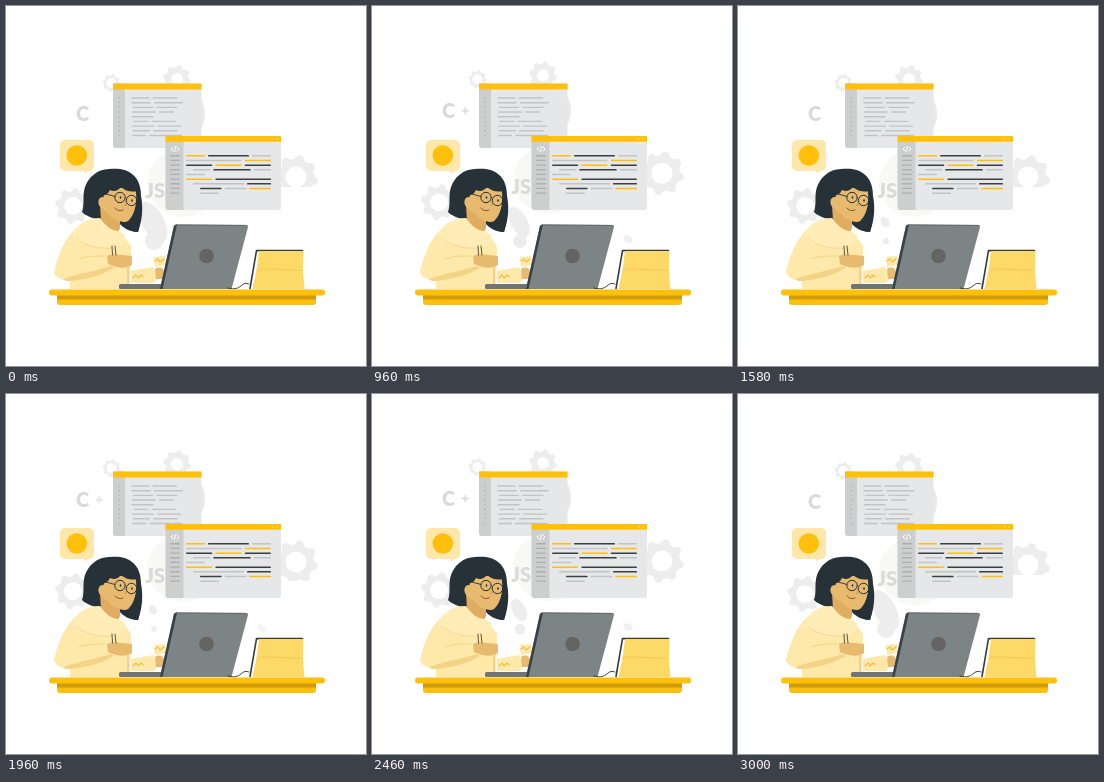
These frames come from a looping animation (360 px wide and 360 px high, 3.04 s). An HTML page with a canvas:

```html
<!DOCTYPE html>
<html lang="en">
<head>
<meta charset="utf-8">
<title>Coding at the desk</title>
<style>
  html, body { margin: 0; width: 100%; height: 100%; overflow: hidden; background: #fff; }
  canvas { display: block; width: 360px; height: 360px; }
</style>
</head>
<body>
<canvas id="stage"></canvas>
<script>
const LOOP = 3040, TAU = Math.PI * 2;
const canvas = document.getElementById('stage');
const c = canvas.getContext('2d');
const dpr = window.devicePixelRatio || 1;
canvas.width = canvas.height = 360 * dpr;

const AMBER = '#ffc00b', DARK = '#263238', SKIN = '#e8ba70', NECK = '#dfac60';
const CREAM = '#fee8aa', SHADE = '#f4d386', GREY = '#c2c4c4', MIST = '#ededed';
const INK = { a: AMBER, d: '#39413f', g: GREY };

function shape(d, fill) {
  c.fillStyle = fill;
  c.fill(new Path2D(d));
}
function stroke(d, color, width) {
  c.strokeStyle = color;
  c.lineWidth = width;
  c.lineCap = c.lineJoin = 'round';
  c.stroke(new Path2D(d));
}
function box(x, y, w, h, r, fill) {
  c.fillStyle = fill;
  c.beginPath();
  c.roundRect(x, y, w, h, r);
  c.fill();
}
function oval(x, y, rx, ry, fill, turn = 0) {
  c.fillStyle = fill;
  c.beginPath();
  c.ellipse(x, y, rx, ry, turn, 0, TAU);
  c.fill();
}
function gear(x, y, r, hole) {
  const teeth = 8;
  c.beginPath();
  for (let i = 0; i < teeth * 4; i++) {
    const a = (i + .5) * TAU / teeth / 4;
    const d = i % 4 < 2 ? r : r * .82;
    c.lineTo(x + Math.cos(a) * d, y + Math.sin(a) * d);
  }
  c.closePath();
  c.moveTo(x + hole, y);
  c.arc(x, y, hole, 0, TAU);
  c.fillStyle = MIST;
  c.fill('evenodd');
}
function random(seed) {
  return () => (seed = seed * 16807 % 2147483647) / 2147483647;
}

function backdrop(t) {
  // everything behind the windows floats up and back twice per loop
  const rise = Math.sin(TAU * t / LOOP) ** 2;
  c.save();
  c.translate(0, -4.5 * rise);
  oval(175, 108, 24, 27, '#e9e9e9');
  oval(177, 177, 36, 34, '#f8f8f7');
  gear(171, 73, 14, 6);
  gear(105.5, 77, 9, 5);
  gear(67, 200, 18, 9);

  c.save();
  c.beginPath();
  c.rect(270, 140, 50, 41 + 14 * rise);
  c.clip();
  gear(290, 171, 22, 10.5);
  c.restore();

  c.font = '900 20px Lato, sans-serif';
  c.fillStyle = '#dadada';
  c.textAlign = 'right';
  c.fillText('JS', 159, 192);
  c.textAlign = 'left';
  c.fillText('C', 70, 115.5);
  c.globalAlpha = rise;
  stroke('M90.5 108.5H96M93.2 105.8V111.2', '#dadada', 2);
  oval(256, 237, 5, 3.5, MIST, .5);
  c.restore();

  const size = .52 + .45 * Math.cos(TAU * (t - 300) / LOOP);
  oval(147, 216, 3 + 9 * size, 3 + 22 * size, MIST, -.5);
  oval(148, 235, 2 + 8 * size, 2 + 8 * size, MIST);
}

function frame(x, y, w, h, side) {
  box(x, y, w, h, [0, 0, 2, 3], '#e6e7e8');
  box(x, y, side, h, [0, 0, 0, 3], '#cdcfcf');
  box(x, y, w, 5.8, [1, 1, 0, 0], AMBER);
}

function notes() {
  frame(107, 77.6, 88.5, 64.4, 12);
  const rnd = random(11);
  for (let i = 0; i < 9; i++) {
    const y = 91.3 + i * 4.68, x = 125 + 3 * rnd(), end = 165 + 14 * rnd();
    const cut = x + 14 + 14 * rnd();
    box(112, y, 2.2, 1.2, .6, '#b6b8b8');
    box(x, y, cut - x, 1.4, .7, GREY);
    if (i !== 4) box(cut + 3, y, end - cut - 3, 1.4, .7, GREY);
  }
}

// a run of letters is one bar, leading spaces indent
function codeRow(row, y) {
  const runs = row.trim().match(/(.)\1*/g);
  let x = 180 + 7 * row.search(/\S/);
  const unit = row.trim().length < 3 ? 22 : (268 - x) / row.trim().length;
  for (const run of runs) {
    box(x, y, run.length * unit - 3, 1.5, .7, INK[run[0]]);
    x += run.length * unit;
  }
}

function editor() {
  frame(159.5, 130, 115.5, 74, 18);
  oval(267, 133, .7, .7, '#ffe48a');
  oval(271, 133, .7, .7, '#ffe48a');
  stroke('M167 141L165 143L167 145M171 141L173 143L171 145M169.7 140.5L168.3 145.5', '#fff', 1);
  const rows = ['addg', 'gga', 'dad', ' gddg', 'g', 'add', ' ggd', '  dga', '  g'];
  rows.forEach((row, i) => {
    const y = 149.1 + i * 4.67;
    box(164, y, 10, 1.3, .6, '#aeb0b0');
    codeRow(row, y);
  });
}

function bubble() {
  box(54, 134, 34, 31, 5, '#ffe7aa');
  shape('M77 164L79.5 167.5L83 164Z', '#ffe7aa');
  oval(70.8, 149.5, 10.3, 10.3, AMBER);
}

function head() {
  shape('M103 163C112 162 121 163 126 168C133 173 135 182 135 190C137 200 137 212 132 226C124 226 117 222 113 217L95 214C86 213 79 209 76 206C79 198 76 190 79 181C82 172 91 163 103 163Z', DARK);
  shape('M94 198L95 216L104 228Q111 231 114 222L114 208Z', NECK);
  shape('M98 182H129C132 193 131 207 126 213C120 219 109 215 103 208L97 204Z', SKIN);
  oval(97, 197, 4.5, 6, SKIN, -.3);
  shape('M91 190Q101 191 104 184Q110 187 115 181Q122 187 131 185L130 174L115 167L96 172Z', DARK);
  shape('M130 180C136 194 136 213 132 226C126 226 121 223 117 218C128 214 132 199 130 180Z', DARK);
  for (const [x, y] of [[114, 191.5], [125.5, 194.5]]) {
    c.beginPath();
    c.arc(x, y, 5.2, 0, TAU);
    c.strokeStyle = DARK;
    c.lineWidth = 1;
    c.stroke();
    oval(x + .5, y, .8, 1.3, DARK);
  }
  stroke('M100 188L109 190.5', DARK, .9);
  stroke('M119.5 195L120.5 199L118.5 199.3', '#c28b4a', .8);
  stroke('M109 202Q112 206 117 204', '#7d4931', .9);
}

function hoodie() {
  shape('M82 216C65 221 54 240 48 266C50 274 62 275 64 274L64 283H124L125 240L116 228Z', CREAM);
  shape('M94 212C80 212 69 219 66 231C76 241 92 243 106 242C113 242 120 238 119 229L113 225C105 225 99 219 94 212Z', '#ffecb6');
  stroke('M70 232C79 241 95 243 106 242', SHADE, .8);
  stroke('M73 253C80 250 90 250 99 250', SHADE, 1);
  shape('M57 273C74 267 89 265 105 260L108 262C94 270 75 275 60 275Z', SHADE);
  shape('M101 250C107 247 114 249 126 250L126 259C118 264 108 261 102 258Z', SKIN);
  stroke('M106 240L106.5 249M109 240L110 249', '#4a4436', .9);
  stroke('M122 261V278', SKIN, 1);
  shape('M125 265L147 261L152 272L148 277H125Z', CREAM);
  shape('M149 263C153 260 158 262 158 266L157 273H150Z', SKIN);
  shape('M148 251L159 250L160 259L149 261Z', CREAM);
  stroke('M127 272L130 269L132 272L135 269L137 271M149 255L152 253L154 256L158 253', '#efbd3c', 1.1);
}

function laptop() {
  box(113, 278, 46, 5, 1.5, '#6f7476');
  shape('M170 218.5L240 219Q242.5 219 242 221L225.5 283H154L168 220Z', '#7d8486');
  shape('M168 219.5L171 218.5L156.5 283H154Z', '#364247');
  stroke('M170 218.9L240 219.4', '#566064', .8);
  oval(200.5, 250, 7.3, 7.3, '#646462');
}

function tablet() {
  stroke('M222 282C229 284 232 282 235 280C238 277 240 277 243 278', DARK, .9);
  stroke('M296.5 244.6H250.5L244 282.5', '#343d3d', 1.6);
  shape('M253 245H297.5L296.8 264L298.5 283H246.5L250.5 264Z', '#fdd968');
  stroke('M251 264L258 262.8L296.5 264.4', '#f3c650', .8);
}

function desk() {
  box(51, 288, 259, 11, [0, 0, 3, 3], AMBER);
  box(51, 289, 259, 4.6, 0, '#d09c0c');
  box(43, 283.5, 276, 6.1, 3, AMBER);
}

function draw(t) {
  c.setTransform(dpr, 0, 0, dpr, 0, 0);
  c.fillStyle = '#fff';
  c.fillRect(0, 0, 360, 360);
  backdrop(t);
  notes();
  editor();
  bubble();
  head();
  hoodie();
  laptop();
  tablet();
  desk();
}

const start = performance.now();
function tick() {
  draw((performance.now() - start) % LOOP);
  requestAnimationFrame(tick);
}
tick();
</script>
</body>
</html>
```
